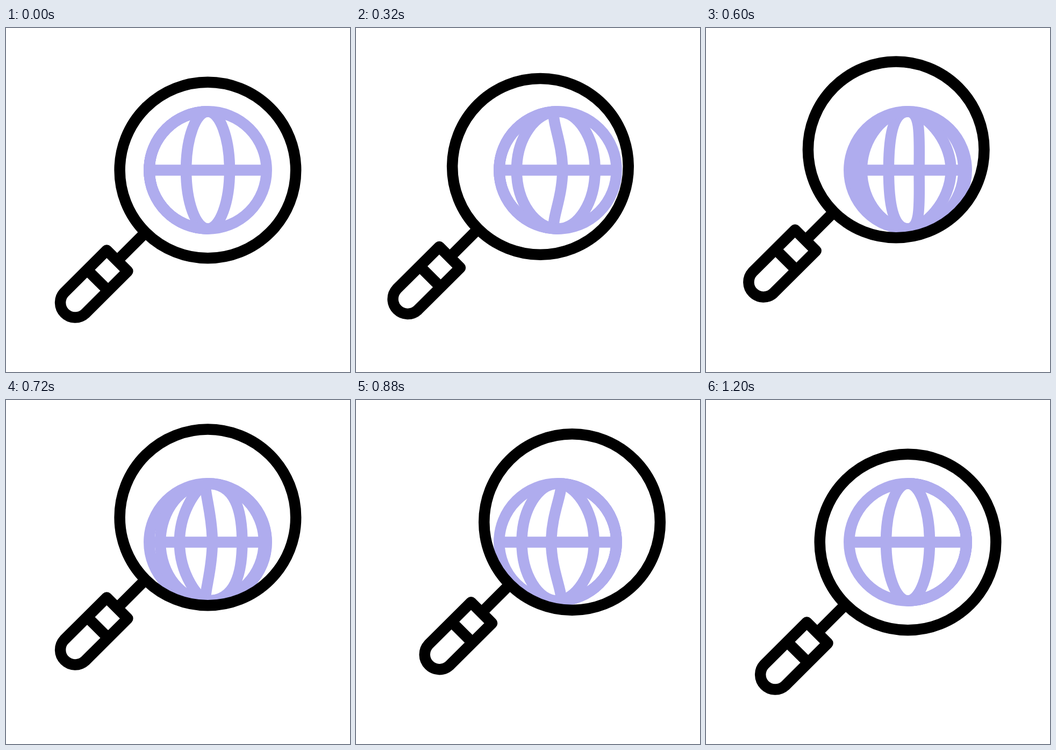
Animation, 640 px wide and 640 px high, one loop 1600 ms. Source, as an HTML page without scripts:

```html
<!DOCTYPE html>
<html lang="en">
<head>
<meta charset="utf-8">
<title>Globe search</title>
<style>
  html, body { margin: 0; width: 100%; height: 100%; overflow: hidden; background: #fff; }
  svg { display: block; width: 100%; height: 100%; }
  .globe, .magnifier { fill: none; stroke-width: 20.5; }
  .globe { stroke: #afacee; }
  .magnifier { stroke: #000; stroke-linejoin: round; }
</style>
</head>
<body>
<svg viewBox="0 0 640 640">
  <g class="globe" transform="translate(375.5 264.5)">
    <circle r="109.2"/>
    <path d="M-109 0H109"/>

    <!-- Meridians drift right; at either rim they merge with the outline -->
    <path>
      <animate attributeName="d" dur="1.6s" repeatCount="indefinite" calcMode="spline"
        keyTimes="0;.45;1" keySplines=".33 0 .67 1;0 0 1 1"
        values="M0-109C22.4-109 40.5-60 40.5 0S22.4 109 0 109;
                M0-109C60-109 109-60 109 0S60 109 0 109;
                M0-109C60-109 109-60 109 0S60 109 0 109"/>
    </path>
    <path>
      <animate attributeName="d" dur="1.6s" repeatCount="indefinite"
        keyTimes="0;.1;.2;.3;.375;.45;.525;1"
        values="M0-109C-22.4-109-40.5-60-40.5 0S-22.4 109 0 109;
                M0-109C-23-109-26.5-60-26.5 0S-23 109 0 109;
                M0-109C-21-109 8.5-60 8.5 0S-21 109 0 109;
                M0-109C-3-109 49.5-60 49.5 0S-3 109 0 109;
                M0-109C28-109 80-60 80 0S28 109 0 109;
                M0-109C57-109 104.5-60 104.5 0S57 109 0 109;
                M0-109C60-109 109-60 109 0S60 109 0 109;
                M0-109C60-109 109-60 109 0S60 109 0 109"/>
    </path>
    <path>
      <animate attributeName="d" dur="1.6s" repeatCount="indefinite"
        keyTimes="0;.15;.2;.3;.45;.525;1"
        values="M0-109C-60-109-109-60-109 0S-60 109 0 109;
                M0-109C-60-109-109-60-109 0S-60 109 0 109;
                M0-109C-42-109-77-60-77 0S-42 109 0 109;
                M0-109C0-109-22-60-22 0S0 109 0 109;
                M0-109C50-109 63.5-60 63.5 0S50 109 0 109;
                M0-109C60-109 109-60 109 0S60 109 0 109;
                M0-109C60-109 109-60 109 0S60 109 0 109"/>
    </path>
    <path>
      <animate attributeName="d" dur="1.6s" repeatCount="indefinite"
        keyTimes="0;.25;.3;.45;.55;.625;1"
        values="M0-109C-60-109-109-60-109 0S-60 109 0 109;
                M0-109C-60-109-109-60-109 0S-60 109 0 109;
                M0-109C-44-109-80-60-80 0S-44 109 0 109;
                M0-109C-13-109 8-60 8 0S-13 109 0 109;
                M0-109C31-109 67-60 67 0S31 109 0 109;
                M0-109C60-109 109-60 109 0S60 109 0 109;
                M0-109C60-109 109-60 109 0S60 109 0 109"/>
    </path>
    <path>
      <animate attributeName="d" dur="1.6s" repeatCount="indefinite"
        keyTimes="0;.25;.3;.375;.45;.55;.65;.7;.75;1"
        values="M0-109C-60-109-109-60-109 0S-60 109 0 109;
                M0-109C-60-109-109-60-109 0S-60 109 0 109;
                M0-109C-58-109-106-60-106 0S-58 109 0 109;
                M0-109C-44-109-86-60-86 0S-44 109 0 109;
                M0-109C-16-109-53-60-53 0S-16 109 0 109;
                M0-109C18-109-12.5-60-12.5 0S18 109 0 109;
                M0-109C22-109 23.5-60 23.5 0S22 109 0 109;
                M0-109C22.4-109 35-60 35 0S22.4 109 0 109;
                M0-109C22.4-109 40.5-60 40.5 0S22.4 109 0 109;
                M0-109C22.4-109 40.5-60 40.5 0S22.4 109 0 109"/>
    </path>
    <path>
      <animate attributeName="d" dur="1.6s" repeatCount="indefinite" calcMode="spline"
        keyTimes="0;.28;.75;1" keySplines="0 0 1 1;.33 0 .67 1;0 0 1 1"
        values="M0-109C-60-109-109-60-109 0S-60 109 0 109;
                M0-109C-60-109-109-60-109 0S-60 109 0 109;
                M0-109C-22.4-109-40.5-60-40.5 0S-22.4 109 0 109;
                M0-109C-22.4-109-40.5-60-40.5 0S-22.4 109 0 109"/>
    </path>
  </g>

  <g class="magnifier" transform="translate(375.5 264.5)">
    <animateTransform attributeName="transform" type="translate" dur="1.6s" repeatCount="indefinite"
      keyTimes="0;.05;.1;.15;.2;.25;.275;.3;.3375;.375;.4125;.45;.5;.55;.575;.6;.625;.65;.675;.7125;.75;1"
      values="375.5 264.5; 366.8 265.4; 358.3 264.7; 350.2 262.2; 343 258; 338.9 250.8;
              338.4 246.5; 340 242; 345 234; 353.5 226.5; 364 220.8; 375.2 218.4;
              390 219.8; 402 227; 405 232.5; 405.3 238.5; 402.3 244; 396.7 249;
              391.3 253.7; 383.5 259.7; 375.5 264.5; 375.5 264.5"/>
    <circle r="163.8"/>
    <path d="M-115 115L-166 166"/>
    <path d="M-188 149L-149 188L-228 266.7A27.6 27.6 0 0 1-267 227.7Z"/>
    <path d="M-224.4 185.4L-185.3 224.3"/>
  </g>
</svg>
</body>
</html>
```
